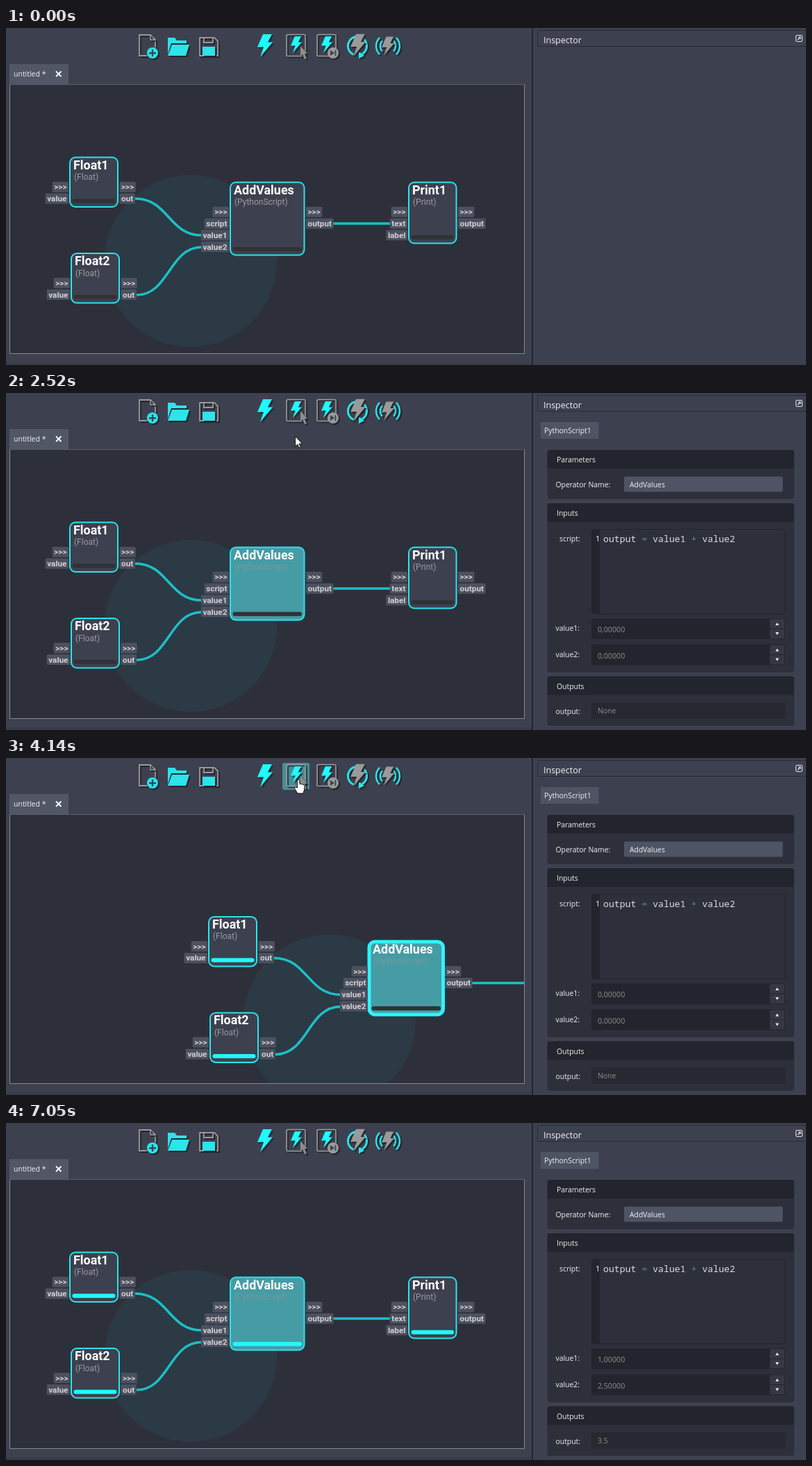
Animation of 1152 by 486 pixels, one loop 7.45 s. Source, as an HTML page with a canvas:

```html
<!DOCTYPE html>
<html lang="en">
<head>
<meta charset="utf-8">
<title>Node editor</title>
<style>
html, body { margin: 0; width: 100%; height: 100%; overflow: hidden; background: #3d414f; }
canvas { display: block; width: 1152px; height: 486px; }
</style>
</head>
<body>
<canvas id="stage" width="1152" height="486"></canvas>
<script>
const ctx = document.getElementById('stage').getContext('2d');
const LOOP = 7450, TICK = 66.5;
const CYAN = '#2be4ec', BRIGHT = '#1ffafd', GREY = '#9a9a9a';
const PANEL = '#2d303b', DARK = '#23252e', WINDOW = '#3d414f', FIELD = '#4f5464';
const UI = '"Open Sans", "Noto Sans", sans-serif';
const NODE = 'Roboto, sans-serif';

// Ticks at which things happen
const CLICK_NODE = 13, PRESS = 50, RELEASE = 52, RUN = 56.5, PER_NODE = 2.5, RESULT = 65;

const nodes = {
  float1: { x: 92, y: 186.5, w: 69, h: 71.5, title: 'Float1', type: '(Float)', ins: ['value'], outs: ['out'], order: 1 },
  float2: { x: 94, y: 325, w: 69, h: 71.5, title: 'Float2', type: '(Float)', ins: ['value'], outs: ['out'], order: 0 },
  add: { x: 323, y: 222.5, w: 106.5, h: 105, title: 'AddValues', type: '(PythonScript)', ins: ['script', 'value1', 'value2'], outs: ['output'], order: 2 },
  print: { x: 580, y: 222.5, w: 68.5, h: 88, title: 'Print1', type: '(Print)', ins: ['text', 'label'], outs: ['output'], order: 9 }
};

// Pan offsets that centre each node in turn while it runs
const panStops = [[0, 0], [248, -85], [250, 53], [0, 0]];

// Pointer path: tick, x, y
const pointerPath = [
  [3, 470, 420], [9, 380, 285], [13, 358, 254], [25, 358, 254], [30, 378, 190], [36, 414, 77],
  [42, 421, 31], [74, 421, 31], [78, 404, 140], [82, 366, 299], [85, 366, 299], [88, 450, 330],
  [94, 900, 440], [95, 930, 450], [97, 808, 467], [98, 846, 472], [100, 948, 469], [103, 948, 469], [105, 993, 477]
];

const lerp = (a, b, k) => a + (b - a) * k;

function pointerAt(n) {
  const next = pointerPath.findIndex(p => p[0] >= n);
  if (n < pointerPath[0][0] || next < 0) return null;
  const b = pointerPath[next], a = pointerPath[Math.max(0, next - 1)];
  const k = b === a ? 0 : (n - a[0]) / (b[0] - a[0]);
  return { x: Math.round(lerp(a[1], b[1], k)), y: Math.round(lerp(a[2], b[2], k)) };
}

function panAt(progress) {
  if (progress <= 0 || progress >= 3) return [0, 0];
  const i = Math.floor(progress), k = progress - i;
  return [0, 1].map(c => lerp(panStops[i][c], panStops[i + 1][c], k));
}

const inside = (p, x, y, w, h) => p && p.x >= x && p.x <= x + w && p.y >= y && p.y <= y + h;

function rect(x, y, w, h, fill) {
  ctx.fillStyle = fill;
  ctx.fillRect(x, y, w, h);
}

function box(x, y, w, h, r, fill, stroke, width = 1) {
  ctx.beginPath();
  ctx.roundRect(x, y, w, h, r);
  if (fill) { ctx.fillStyle = fill; ctx.fill(); }
  if (stroke) { ctx.strokeStyle = stroke; ctx.lineWidth = width; ctx.stroke(); }
}

function poly(points, fill, stroke, width = 1, closed = true) {
  ctx.beginPath();
  points.forEach(([x, y]) => ctx.lineTo(x, y));
  if (closed) ctx.closePath();
  if (fill) { ctx.fillStyle = fill; ctx.fill(); }
  if (stroke) { ctx.strokeStyle = stroke; ctx.lineWidth = width; ctx.stroke(); }
}

function arc(x, y, r, from, to, stroke, width) {
  ctx.beginPath();
  ctx.arc(x, y, r, from, to);
  ctx.strokeStyle = stroke;
  ctx.lineWidth = width;
  ctx.stroke();
}

function disc(x, y, r, fill) {
  ctx.beginPath();
  ctx.arc(x, y, r, 0, Math.PI * 2);
  ctx.fillStyle = fill;
  ctx.fill();
}

function text(str, x, y, font = `10.4px ${UI}`, fill = '#f2f2f2', align = 'left') {
  ctx.font = font;
  ctx.fillStyle = fill;
  ctx.textAlign = align;
  ctx.fillText(str, x, y);
}

function bolt(x, y, scale, fill) {
  const shape = [[-3, -16.5], [10, -16.5], [4, -5], [11, -5], [-7, 16.5], [-2, 2], [-11, 2]];
  poly(shape.map(([px, py]) => [x + px * scale, y + py * scale]), fill);
}

function toolbar(hover, pressed) {
  if (hover) box(398, 7, 39, 39, 3, pressed ? '#3f858e' : '#478f98');
  ctx.save();
  ctx.shadowColor = '#24262d';
  ctx.shadowOffsetX = ctx.shadowOffsetY = 2;
  ctx.shadowBlur = 1;
  ctx.lineJoin = 'round';

  // New
  poly([[203, 40], [192, 40], [192, 10], [208, 10], [215, 17], [215, 28]], null, GREY, 1.8, false);
  poly([[208, 10], [208, 17], [215, 17]], null, GREY, 1.5, false);
  disc(211, 36, 8, CYAN);
  // Open
  poly([[233, 37], [233, 14], [243, 14], [246, 18], [260, 18], [260, 22], [238, 22]], CYAN);
  poly([[239, 24], [264, 24], [259, 40], [233, 40]], CYAN);
  // Save
  poly([[279, 14], [300, 14], [305, 19], [305, 40], [279, 40]], null, GREY, 1.8);
  poly([[285, 14], [285, 21], [298, 21], [298, 14]], null, GREY, 1.8, false);
  rect(283, 27, 18, 13, CYAN);
  // Run variants
  bolt(373, 25.5, 1, BRIGHT);
  for (const x of [404, 448]) {
    box(x, 9.5, 27, 31, 2, null, GREY, 1.6);
    bolt(x + 14, 24, 0.72, BRIGHT);
  }
  poly([[424, 26], [424, 41], [427, 38], [430, 45], [433, 44], [430, 37], [434, 37]], '#8d8d8d');
  disc(471, 36, 8, GREY);
  // Loop
  arc(506, 26, 13.5, 2.0, 4.7, CYAN, 3);
  arc(506, 26, 13.5, -0.9, 1.2, CYAN, 3);
  poly([[508, 34], [508, 44], [516, 40]], CYAN);
  bolt(507, 25, 0.98, GREY);
  // Live
  for (const [r, spread] of [[11, 0.75], [17, 0.8]]) {
    arc(550, 26, r, -spread, spread, CYAN, 2.4);
    arc(550, 26, r, Math.PI - spread, Math.PI + spread, CYAN, 2.4);
  }
  bolt(550, 26, 0.82, GREY);
  ctx.restore();

  rect(206, 35, 10, 2.4, WINDOW);
  rect(209.8, 31, 2.4, 10, WINDOW);
  poly([[467, 32], [467, 40], [473, 36]], WINDOW);
  rect(473.5, 32, 1.8, 8, WINDOW);
}

function port(label, edge, y, isInput) {
  ctx.font = `bold 11.8px ${NODE}`;
  const w = ctx.measureText(label).width + 5;
  const x = isInput ? edge - w : edge;
  box(x, y - 7.5, w, 15, 1.5, '#4d505e');
  text(label, x + 2.5, y + 4, ctx.font, '#d0d0d4');
}

const rowY = (node, row) => node.y + 42.7 + row * 16.8;

function drawNode(node, progress, selected, hovered) {
  const { x, y, w, h } = node;
  const active = Math.floor(progress) === node.order;
  const done = progress >= node.order + 1;
  const fill = selected ? (hovered ? '#50aeb8' : '#459ca5') : (hovered ? '#464b5a' : WINDOW);
  box(x, y, w, h, 8, fill);
  text(node.type, x + 6, y + 32.5, `12px ${NODE}`, selected ? '#7c9599' : '#999aa0');
  text(node.title, x + 5, y + 17, `bold 17.9px ${NODE}`, '#fff');
  box(x + 3.5, y + h - 11.8, w - 7, 6, 3, done ? BRIGHT : '#303236');
  box(x, y, w, h, 8, null, active ? '#2ef4f9' : CYAN, active ? 5 : 2);
  ['>>>', ...node.ins].forEach((label, i) => port(label, x - 2, rowY(node, i), true));
  ['>>>', ...node.outs].forEach((label, i) => port(label, x + w + 2.5, rowY(node, i), false));
}

function wire(x1, y1, x2, y2) {
  const mid = (x1 + x2) / 2;
  ctx.beginPath();
  ctx.moveTo(x1, y1);
  ctx.bezierCurveTo(mid, y1, mid, y2, x2, y2);
  ctx.strokeStyle = '#1cc0c6';
  ctx.lineWidth = 3.5;
  ctx.stroke();
}

function graph(n, progress, pointer) {
  rect(5, 52, 85, 29, '#525766');
  text('untitled *', 11, 70, `10.5px ${UI}`);
  poly([[72, 62.5], [79.5, 70]], null, '#fff', 1.8, false);
  poly([[79.5, 62.5], [72, 70]], null, '#fff', 1.8, false);
  rect(5, 81, 742, 389, PANEL);

  ctx.save();
  ctx.beginPath();
  ctx.rect(6, 82, 740, 387);
  ctx.clip();
  ctx.translate(...panAt(progress));
  disc(266, 336, 124, '#2b3a45');
  wire(186, 246, 282, 299);
  wire(188, 385, 282, 316);
  wire(470, 282, 553, 282);
  for (const node of Object.values(nodes)) {
    const hovered = inside(pointer, node.x, node.y, node.w, node.h) && (progress <= 0 || progress >= 3);
    drawNode(node, progress, node === nodes.add && n >= CLICK_NODE, hovered);
  }
  ctx.restore();

  poly([[5.5, 81], [5.5, 469.5], [746.5, 469.5], [746.5, 81]], null, '#84878f', 1, false);
  rect(5, 81, 742, 1, '#5a5e69');
}

function group(title, y, h) {
  box(779.5, y, 355.5, h, 4, PANEL);
  box(779.5, y, 355.5, 27, [4, 4, 0, 0], DARK);
  text(title, 793, y + 18);
}

function spinner(label, value, y) {
  text(label, 791.5, y + 18);
  box(843, y, 279, 30, 3, DARK);
  box(1100, y + 1, 21, 28, 2, '#343844');
  rect(1100, y + 14.5, 21, 1, DARK);
  poly([[1108, y + 10], [1113, y + 10], [1110.5, y + 6]], '#eee');
  poly([[1108, y + 20], [1113, y + 20], [1110.5, y + 24]], '#eee');
  text(value, 852, y + 20, `10.7px ${UI}`, '#8d8f8c');
}

function inspector(n) {
  rect(757, 0, 2, 486, '#22252e');
  box(765.5, 3.5, 400, 23, 2, null, '#292c36');
  text('Inspector', 774, 22, `12.5px ${UI}`);
  box(1137.5, 10.5, 9, 9, 1.5, null, '#e8e8e8');
  poly([[1140, 17], [1144, 13]], null, '#e8e8e8', 1.2, false);
  poly([[1141, 13], [1144, 13], [1144, 16]], null, '#e8e8e8', 1.2, false);
  if (n < CLICK_NODE) return;

  const ready = n >= RESULT;
  rect(770, 42, 83.5, 24, FIELD);
  text('PythonScript1', 775, 58);

  group('Parameters', 82, 71);
  text('Operator Name:', 791.5, 136);
  box(890, 120.5, 228.5, 22, 2, FIELD);
  text('AddValues', 898, 135.5);

  group('Inputs', 159, 244);
  text('script:', 797, 214);
  box(843.5, 196.5, 278.5, 122, 3, PANEL, DARK);
  rect(844, 197, 11, 121, DARK);
  text('1', 849, 213.5, `11px ${UI}`, '#fff');
  const mono = '13.2px "Noto Sans Mono", monospace';
  text('output   value1   value2', 860, 215, mono, '#dcdcdc');
  text('       =        +', 860, 215, mono, '#5b86a0');
  spinner('value1:', ready ? '1,00000' : '0,00000', 325);
  spinner('value2:', ready ? '2,50000' : '0,00000', 362.5);

  group('Outputs', 408.5, 71.5);
  text('output:', 791.5, 463);
  box(843, 446, 279.5, 24, 3, '#272932');
  text(ready ? '3.5' : 'None', 852, 462, `10.4px ${UI}`, '#8d8f8c');
}

function drawPointer({ x, y }, hand) {
  ctx.save();
  ctx.translate(x, y);
  ctx.lineJoin = 'round';
  if (hand) {
    ctx.beginPath();
    ctx.moveTo(-1.5, 12);
    ctx.lineTo(-1.5, 1.5);
    ctx.quadraticCurveTo(0, -1, 1.8, 1.5);
    ctx.lineTo(2, 6.5);
    ctx.quadraticCurveTo(8.5, 6.5, 9, 9.5);
    ctx.lineTo(8.5, 15);
    ctx.lineTo(7, 20);
    ctx.lineTo(-1, 20);
    ctx.lineTo(-5.5, 13);
    ctx.quadraticCurveTo(-5, 9.5, -1.5, 12);
    ctx.closePath();
    ctx.fillStyle = '#fff';
    ctx.fill();
    ctx.strokeStyle = '#111';
    ctx.lineWidth = 1;
    ctx.stroke();
  } else {
    poly([[0.5, 0.5], [0.5, 15], [3.7, 12], [6.2, 17], [8.3, 16], [6, 11.2], [10.5, 11]], '#fff', '#111');
  }
  ctx.restore();
}

function draw(time) {
  const n = Math.floor((time % LOOP) / TICK + 0.1);
  const progress = Math.max(-1, (n - RUN) / PER_NODE);
  const pointer = pointerAt(n);
  const onButton = inside(pointer, 398, 7, 39, 39);
  rect(0, 0, 1152, 486, WINDOW);
  rect(0, 482, 757, 4, '#383c49');
  toolbar(onButton, n >= PRESS && n < RELEASE);
  graph(n, progress, pointer);
  inspector(n);
  if (pointer) drawPointer(pointer, onButton);
}

const start = performance.now();
function loop() {
  draw(performance.now() - start);
  requestAnimationFrame(loop);
}
loop();
</script>
</body>
</html>
```
